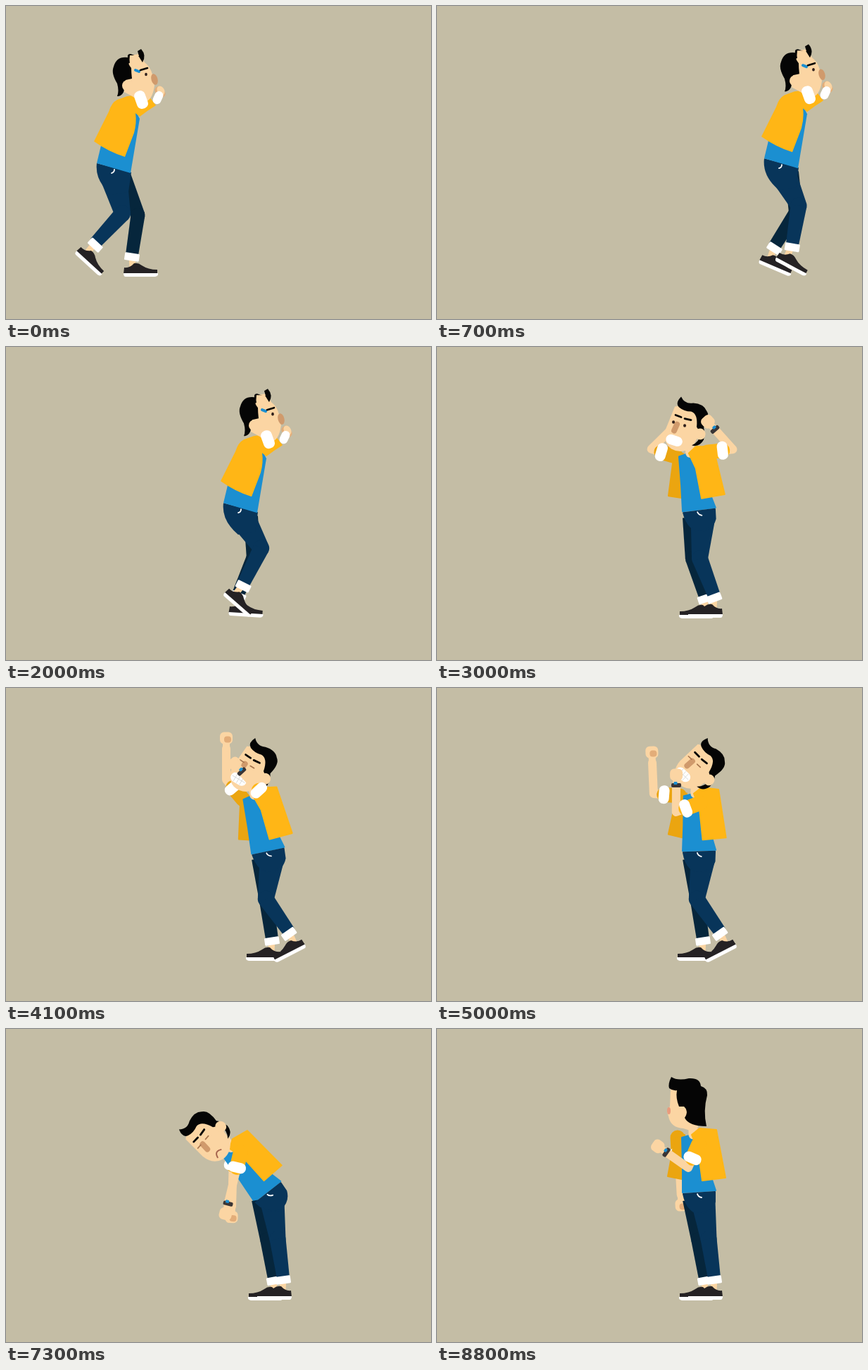
These frames come from a looping animation (604x444 px, 8.9 s). An HTML page:

```html
<!DOCTYPE html>
<html lang="en">
<head>
<meta charset="utf-8">
<title>Pacing man</title>
<style>
html, body { margin: 0; width: 100%; height: 100%; overflow: hidden; background: #c4bda5; }
svg { display: block; width: 100vw; height: 100vh; }
</style>
</head>
<body>
<svg viewBox="0 0 604 444"><g id="man"></g></svg>
<script>
const LOOP = 8900, STEP = 100;
const C = {
  skin: '#fbd5a3', shade: '#e3ad79', nose: '#d09a6c', hair: '#050505', coat: '#ffb616',
  coatFar: '#eba510', shirt: '#1b8fd1', jean: '#08355a', jeanFar: '#06263c', white: '#fff', shoe: '#252224'
};
const man = document.getElementById('man');

const lerp = (a, b, k) => a + (b - a) * k;
const mix = (a, b, k) => Array.isArray(a) ? a.map((v, i) => lerp(v, b[i], k)) : lerp(a, b, k);
const smooth = k => k * k * (3 - 2 * k);
const rad = deg => deg * Math.PI / 180;
const turn = (x, y, deg) => {
  const c = Math.cos(rad(deg)), s = Math.sin(rad(deg));
  return [x * c - y * s, x * s + y * c];
};
const add = (a, b) => [a[0] + b[0], a[1] + b[1]];
const angle = (a, b) => Math.atan2(b[1] - a[1], b[0] - a[0]) * 180 / Math.PI;

const path = (d, fill) => `<path d="${d}" fill="${fill}"/>`;
const line = (d, color, w) =>
  `<path d="${d}" fill="none" stroke="${color}" stroke-width="${w}" stroke-linecap="round" stroke-linejoin="round"/>`;
const cloth = (d, fill) => `<path d="${d}" fill="${fill}" stroke="${fill}" stroke-width="2" stroke-linejoin="round"/>`;
const oval = (x, y, rx, ry, fill, rot = 0) =>
  `<ellipse cx="${x}" cy="${y}" rx="${rx}" ry="${ry}" fill="${fill}" transform="rotate(${rot} ${x} ${y})"/>`;
const box = ([x, y], w, h, r, rot, fill) =>
  `<rect x="${-w / 2}" y="${-h / 2}" width="${w}" height="${h}" rx="${r}" fill="${fill}" transform="translate(${x} ${y}) rotate(${rot})"/>`;
const group = (t, s) => `<g transform="${t}">${s}</g>`;

function taper(a, b, wa, wb, fill) {
  const rot = angle(a, b) + 90;
  const side = (p, w) => add(p, turn(w / 2, 0, rot));
  return `<polygon points="${[side(a, wa), side(b, wb), side(b, -wb), side(a, -wa)]}" fill="${fill}"/>`;
}

// Two-bone limb: returns middle joint and reachable end.
function reach(a, b, l1, l2, bend) {
  const rot = angle(a, b), d = Math.min(Math.hypot(b[0] - a[0], b[1] - a[1]), l1 + l2);
  const along = (l1 * l1 - l2 * l2 + d * d) / (2 * d);
  const out = Math.sqrt(Math.max(0, l1 * l1 - along * along)) * bend;
  return [add(a, turn(along, out, rot)), add(a, turn(d, 0, rot))];
}

const shoe = path('M0-4L1-13Q9-12 15-19Q21-20 26-16Q35-10 48-10V-4Z', C.shoe) +
  path('M0-5H49Q50-1 45 0H3Q0 0 0-5Z', C.white);

function leg(hip, width, [x, y, rot], dir, bend, far) {
  const fill = far ? C.jeanFar : C.jean, kw = far ? 20 : 23;
  const fromHeel = (dx, dy) => {
    const v = turn(dx, dy, rot);
    return [x + dir * v[0], y + v[1]];
  };
  const ankle = fromHeel(12, -31);
  const [knee] = reach(hip, ankle, 58, 57, -dir * bend);
  return line(`M${ankle}L${fromHeel(13, -13)}`, C.skin, 9) +
    group(`translate(${x} ${y}) scale(${dir} 1) rotate(${rot})`, shoe) +
    taper(hip, knee, width, kw, fill) + oval(...knee, kw / 2, kw / 2, fill) +
    taper(knee, ankle, kw, 18, fill) +
    box(add(ankle, [0, 3]), 21, 11, 1.5, angle(knee, ankle) - 90, C.white);
}

function arm(shoulder, target, bend, far) {
  const [elbow, wrist] = reach(shoulder, target, 37, far ? 44 : 38, bend);
  const cuff = mix(shoulder, elbow, .6), rot = angle(elbow, wrist);
  const hand = add(wrist, turn(15, 0, rot));
  let s = line(`M${cuff}L${elbow}L${wrist}`, C.skin, 12) +
    line(`M${wrist}L${hand}`, C.skin, 10) + box(hand, 17, 18, 6, rot, C.skin);
  if (far) s += box(add(hand, [2, 2]), 9, 10, 4, rot, C.shade);
  else s += box(wrist, 6, 14, 2, rot, '#3a3535') + box(add(wrist, [-1, -3]), 4, 5, 1, rot, C.shirt);
  return s + line(`M${shoulder}L${cuff}`, far ? C.coatFar : C.coat, 21) +
    box(cuff, 15, 26, 7, angle(shoulder, elbow), C.white);
}

// ---- walking in profile ----
const walkTop =
  path('M185 150L190 160L177 237L129 223L135 198Z', C.shirt) +
  path('M158 133Q150 137 146 150L125 192Q146 207 169 214L182 180Q186 165 184 152L190 157Q200 149 213 141L200 124L172 128Z', C.coat) +
  box([219, 122], 12, 17, 5, -30, C.shade) +
  path('M168 88L176 70L190 68L197 80Q205 86 208 97L211 113Q208 136 194 137Q180 128 168 122Z', C.skin) +
  path('M160 128Q167 126 168 118L170 105L179 103Q178 94 178 88Q170 78 180 82L178 75L189 71L187 64L192 61Q200 70 194 80L189 72Q182 70 177 68Q172 68 173 73Q157 71 153 86Q149 95 158 110Q161 121 158 128Z', C.hair) +
  path('M176 70Q174 84 180 87L190 82L188 70Z', C.skin) +
  oval(173, 113, 8, 8, C.skin) +
  oval(211, 104, 4.5, 8, C.nose, -15) + oval(220, 120, 5, 7, C.skin, -30) +
  line('M184 91L189 93', C.shirt, 4) + line('M191 91L201 88', C.hair, 2.6) + oval(199, 97, 1.8, 2.3, '#30201c') +
  box([192, 133], 16, 26, 7, -20, C.white) + box([216, 130], 12, 19, 6, 25, C.white);

// The foot slides back under the body, peels off its toe, then swings forward.
function stride(u) {
  u -= Math.floor(u);
  const x = u < .5 ? 167 - 140 * u : lerp(97, 167, u * 2 - 1);
  const rot = 46 * Math.max(0, Math.sin(Math.PI * (u - .2) / .8));
  return [x, 384 - 49 * Math.sin(rad(rot)), rot];
}

function walk(phase) {
  const bob = 5 * Math.sin(4 * Math.PI * phase + .38) - 1.85;
  return leg([168, 242 + bob], 20, stride(phase), 1, 1, true) +
    leg([152, 238 + bob], 40, stride(phase + .5), 1, 1, false) +
    group(`translate(0 ${bob})`,
      path('M129 223L178 236L174 264L150 268Q126 248 129 223Z', C.jean) +
      line('M150 237Q154 236 154 232', C.white, 1.8) + walkTop);
}

const WALKS = [
  { end: 750, dir: 1, t0: 0, x: 0, v: .48, ph: 0 },
  { end: 1550, dir: -1, t0: 1400, x: 344, v: -.52, ph: .1 },
  { end: 2350, dir: 1, t0: 2000, x: 180, v: .48, ph: .22 },
  { end: 2750, dir: -1, t0: 2400, x: 689, v: -.5, ph: .25 }
];

// ---- standing: lean, head tilt, elbow opening, knee bend, wrists, heels ----
const WAIST = [372, 232];
const grip = {
  lean: -3, tilt: 0, open: 1, knee: 1,
  hand: [395, 117], handFar: [336, 114], heel: [406, 384, 0], heelFar: [393, 385, 0]
};
const fists = { ...grip, lean: 2, tilt: 25, open: 0, hand: [340, 138], handFar: [306, 106], heel: [427, 368, 27], heelFar: [390, 387, 0] };
const raised = { ...fists, tilt: 18, open: 1, hand: [400, 72], handFar: [320, 66] };
const punch = { ...fists, lean: -18, tilt: 8, hand: [270, 165] };
const recoil = { ...grip, lean: 9, tilt: 18, hand: [418, 112], handFar: [350, 115] };
const rest = { ...grip, lean: 0, tilt: -5, open: 0, knee: 0, hand: [356, 240], handFar: [347, 240] };
const slump = { ...rest, lean: -34, tilt: -67, hand: [315, 250], handFar: [321, 252] };
const watch = { ...rest, hand: [326, 175] };

const KEYS = [[2800, grip], [3050, grip]];
for (let i = 0; i < 11; i++) KEYS.push([3200 + 200 * i, [fists, raised, punch][i % 3]]);
KEYS.push([5600, recoil], [6300, recoil], [6600, grip], [7050, slump], [7600, slump],
  [8100, rest], [8450, watch], [LOOP, watch]);

function face(mood) {
  let s = path('M1-48L-12-16Q-17 2-4 12Q10 20 25 10L36-8L38-36L12-50Z', C.skin) +
    path('M10-62Q1-53 7-47Q14-41 24-41Q34-38 32-19L38-10Q36 2 25 7Q36 10 42-1Q44-12 42-18Q52-34 46-42Q42-52 27-53Q15-51 10-62Z', C.hair) +
    oval(37, -9, 7.5, 8, C.skin) + line('M4-23L0-14', C.nose, 8) +
    line('M2-36L10-33M15-31L24-29', C.hair, 2.8);
  s += mood === 'grip'
    ? oval(-1, -26, 2, 2.3, '#30201c') + oval(15, -21, 2, 2.3, '#30201c')
    : line('M-4-27L2-25M12-22L18-20', '#a5744e', 1.6);
  if (mood === 'slump') return s + line('M-5 4Q1-4 7 4', '#a5644e', 2);
  s += box([0, 0], 24, 14, 7, 18, C.white);
  if (mood === 'fists') s += group('rotate(18)', line('M-10 0H10M-5-6V6M0-6V6M5-6V6', '#d5d5d2', .8));
  return s;
}

const profile =
  path('M332 84L331 110Q325 114 329 124Q332 140 350 141L366 146L362 90Z', C.skin) +
  oval(329.5, 116, 2.5, 5, '#e99b7d') +
  path('M333 68Q328 78 330 84Q335 88 341 87Q339 98 344 110L351 110Q358 117 352 126Q358 138 383 138Q378 116 384 94Q385 84 375 81Q374 69 358 70Q342 74 333 68Z', C.hair) +
  oval(349, 118, 5.5, 8, C.skin);

const coatFar = cloth('M-34-77L-20-82L-24-19L-44-23Z', C.coatFar);
const shirt = cloth('M-24-78L-10-82L10-45L24-3L-23 0L-23-37Z', C.shirt);
const pelvis = cloth('M-22 2L23-1L23 13Q18 28 0 30Q-17 26-22 2Z', C.jean) + line('M-2 2Q-1 6 4 7', C.white, 1.8);
const coat = cloth('M-10-82L1-91L25-89L38-21L5-17L-1-60Z', C.coat);

function poseAt(t) {
  const i = KEYS.findIndex(k => k[0] > t);
  const [t0, a] = KEYS[i - 1], [t1, b] = KEYS[i];
  const k = smooth((t - t0) / (t1 - t0)), p = {};
  for (const part in a) p[part] = mix(a[part], b[part], k);
  return p;
}

function stand(t) {
  const p = poseAt(t);
  const mood = t < 3150 || (t >= 5400 && t < 6700) ? 'grip' : t < 5400 ? 'fists' : 'slump';
  const fold = 24 * Math.max(0, -p.lean / 34); // the far side hides as he bends
  const onTorso = (x, y) => add(WAIST, turn(x, y, p.lean));
  const body = s => group(`translate(${WAIST}) rotate(${p.lean})`, s);
  const nape = onTorso(-8, -95), jaw = turn(-22, -5, p.tilt);
  const head = t >= 8150 ? profile : group(`translate(${add(nape, jaw)}) rotate(${p.tilt})`, face(mood));
  return arm(onTorso(fold - 30, -78), p.handFar, -1, true) +
    body(group(`translate(${fold} 0)`, coatFar) + shirt) +
    leg([361, 242], 24, p.heelFar, -1, p.knee, true) +
    leg([378, 242], 35, p.heel, -1, p.knee, false) +
    body(pelvis) + line(`M${nape}L${onTorso(-8, -82)}`, C.skin, 13) + body(coat) + head +
    arm(onTorso(16 * p.open, -69 - 13 * p.open), p.hand, 2 * p.open - 1, false);
}

function draw(t) {
  const w = WALKS.find(s => t < s.end);
  man.innerHTML = w
    ? group(`translate(${w.x + (t - w.t0) * w.v} 0) scale(${w.dir} 1)`, walk((t - w.t0) / 300 + w.ph))
    : stand(t);
}

const start = performance.now();
function tick() {
  const t = (performance.now() - start) % LOOP;
  draw(Math.floor(t / STEP) * STEP);
  requestAnimationFrame(tick);
}
tick();
</script>
</body>
</html>
```
